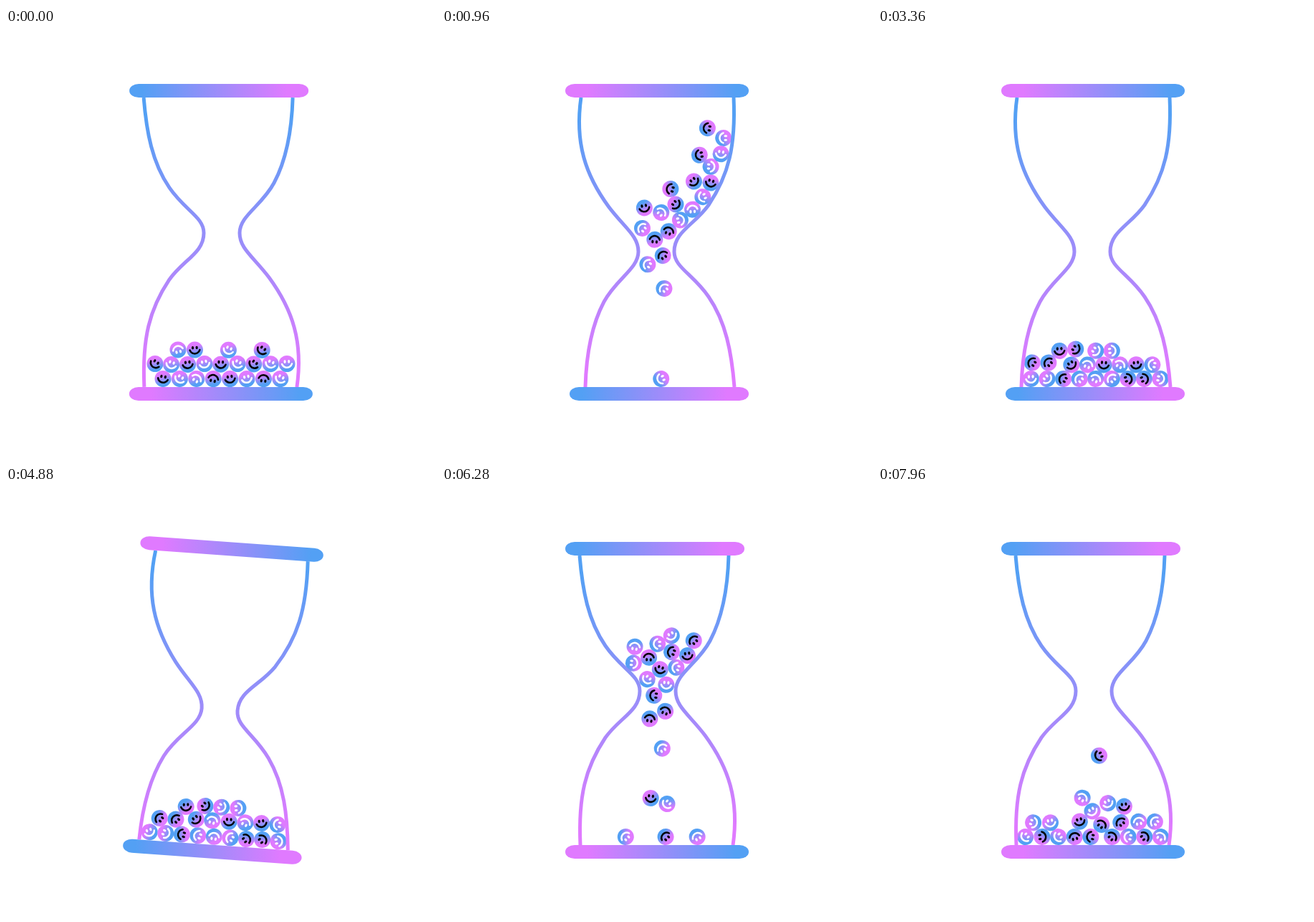
Write an HTML page with a canvas that moves like this. It is 600x600 px and loops after 8 s.

```html
<!DOCTYPE html>
<html lang="en">
<head>
<meta charset="utf-8">
<title>Hourglass</title>
<style>
  html, body { margin: 0; width: 100%; height: 100%; overflow: hidden; background: #fff; }
  canvas { display: block; width: 100vw; height: 100vh; }
  svg { position: absolute; width: 0; height: 0; }
</style>
</head>
<body>
<canvas id="stage" width="600" height="600"></canvas>
<svg aria-hidden="true">
  <path id="left" d="M194 97 C185 160 200 205 233 250 C255 279 274 290 274 312 C274 336 243 350 226 382 C206 420 201 465 200 501"/>
  <path id="right" d="M407 97 C410 165 400 205 372 247 C352 275 324 284 324 312 C324 334 350 343 372 375 C396 410 404 452 408 501"/>
</svg>
<script>
const ctx = document.getElementById('stage').getContext('2d');
const LOOP = 8000, TICK = 40, SUBSTEPS = 20, DT = TICK / 1000 / SUBSTEPS;
const CX = 300, CY = 299, HALF = 202;
const RADIUS = 11.5, CONTACT = 22.6, WALL_GAP = 13;
const GRAVITY = 1300, NECK_DRAG = 8.5, AIR_DRAG = 0.6, MAX_SPEED = 900;
const FIRST_TURN = -20, PERIOD = 4800, TURN_TIME = 560;
const PINK = '#e07aff', BLUE = '#53a0f4';

// The heap at the start: D is dark, L is light, lower case is upside down.
const HEAP = [
  { x: 219, gap: 23.4, y: 489.5, faces: 'DLldDLdL' },
  { x: 208, gap: 23, y: 468.5, faces: 'DLDLDLDLL' },
  { x: 216, gap: 23.5, y: 450, faces: ' lD L D' }
];

const walls = [readWall('left', 1), readWall('right', -1)];

// Keeps the outline for drawing and its x at every whole y for collisions.
function readWall(id, side) {
  const path = document.getElementById(id), edge = [];
  for (let s = 0, end = path.getTotalLength(); s <= end + 0.5; s += 0.25) {
    const p = path.getPointAtLength(Math.min(s, end));
    edge[Math.round(p.y - CY + HALF)] = p.x - CX;
  }
  return { outline: new Path2D(path.getAttribute('d')), edge, side };
}

function turn(ms, start) {
  const p = Math.min(Math.max((ms - start) / TURN_TIME, 0), 1);
  return p < 0.5 ? 4 * p ** 3 : 1 - 4 * (1 - p) ** 3;
}
const glassAngle = ms => Math.PI * (1 + turn(ms, FIRST_TURN) + turn(ms, FIRST_TURN + PERIOD));

// Moves a ball back inside the glass, working in the glass's own axes.
function confine(ball, angle) {
  const c = Math.cos(angle), s = Math.sin(angle), dx = ball.x - CX, dy = ball.y - CY;
  const floor = HALF - RADIUS, clamp = y => Math.min(Math.max(y, -floor), floor);
  let x = c * dx + s * dy, y = clamp(c * dy - s * dx);
  for (const { edge, side } of walls) {
    const i = Math.floor(y + HALF), slope = (edge[i + 2] - edge[i - 2]) / 4;
    const wallX = edge[i] + slope * (y + HALF - i), q = Math.hypot(1, slope);
    const push = WALL_GAP - side * (x - wallX) / q;
    if (push > 0) {
      x += side * push / q;
      y = clamp(y - side * slope * push / q);
    }
  }
  ball.x = CX + c * x - s * y;
  ball.y = CY + s * x + c * y;
}

function settle(balls, angle, rounds) {
  while (rounds--) {
    balls.forEach((a, i) => {
      for (let j = i + 1; j < balls.length; j++) {
        const b = balls[j], dx = b.x - a.x, dy = b.y - a.y, d = Math.hypot(dx, dy);
        if (d >= CONTACT || d === 0) continue;
        const k = (CONTACT - d) / d / 2;
        a.x -= dx * k; a.y -= dy * k;
        b.x += dx * k; b.y += dy * k;
      }
    });
    for (const ball of balls) confine(ball, angle);
  }
}

function createBalls() {
  const balls = [];
  for (const { x, gap, y, faces } of HEAP) {
    [...faces].forEach((face, i) => {
      if (face === ' ') return;
      const upright = face === face.toUpperCase();
      balls.push({
        x: x + gap * i, y, vx: 0, vy: 0, spin: 0,
        dark: face.toUpperCase() === 'D',
        tilt: 0.2 + Math.sin(balls.length * 7.3) * 0.45 + (upright ? 0 : Math.PI)
      });
    });
  }
  return balls;
}

function advance(balls, ms) {
  const angle = glassAngle(ms), swing = angle - glassAngle(ms - DT * 1000);
  for (const b of balls) {
    const inNeck = Math.abs(b.x - CX) < 55 && b.y > 190 && b.y < 310;
    const keep = Math.exp(-(inNeck ? NECK_DRAG : AIR_DRAG) * DT);
    b.oldX = b.x;
    b.oldY = b.y;
    b.x += b.vx * keep * DT;
    b.y += (b.vy * keep + GRAVITY * DT) * DT;
  }
  settle(balls, angle, 4);
  for (const b of balls) {
    b.vx = (b.x - b.oldX) / DT;
    b.vy = (b.y - b.oldY) / DT;
    const limit = Math.min(1, MAX_SPEED / (Math.hypot(b.vx, b.vy) || 1));
    b.vx *= limit;
    b.vy *= limit;
    b.spin += swing + b.vx * DT / (3 * RADIUS);
  }
}

// Works the whole loop out once, so that drawing depends on the time alone.
function simulate() {
  const balls = createBalls(), frames = [];
  settle(balls, glassAngle(0), 30);
  for (let ms = 0; ms < LOOP; ms += TICK) {
    frames.push(balls.map(b => ({ ...b })));
    for (let n = 1; n <= SUBSTEPS; n++) advance(balls, ms + n * DT * 1000);
  }
  return frames;
}

// A gradient through (x, y) reaching the given vector to either side.
function gradient(x, y, dx, dy, from, to, start, end) {
  const g = ctx.createLinearGradient(x - dx, y - dy, x + dx, y + dy);
  g.addColorStop(start, from);
  g.addColorStop(end, to);
  return g;
}

function drawBall(ball) {
  ctx.save();
  ctx.translate(ball.x, ball.y);
  ctx.rotate(ball.spin);
  ctx.fillStyle = gradient(0, 0, 3, RADIUS, PINK, BLUE, 0.25, 0.8);
  ctx.beginPath();
  ctx.arc(0, 0, RADIUS, 0, 2 * Math.PI);
  ctx.fill();
  ctx.rotate(ball.tilt);
  ctx.fillStyle = ctx.strokeStyle = ball.dark ? '#000' : '#fff';
  ctx.lineWidth = 2.5;
  ctx.lineCap = 'round';
  for (const x of [-2.8, 2.8]) {
    ctx.beginPath();
    ctx.ellipse(x, -3, 1.6, 2.3, 0, 0, 2 * Math.PI);
    ctx.fill();
  }
  ctx.beginPath();
  ctx.arc(0, -2, 7.3, 0.1 * Math.PI, 0.9 * Math.PI);
  ctx.stroke();
  ctx.restore();
}

// Colours keep their direction on the stage while the shapes turn.
function drawGlass(angle) {
  const c = Math.cos(angle), s = Math.sin(angle);
  const reach = 108 * Math.abs(s) + HALF * Math.abs(c);
  ctx.strokeStyle = gradient(CX, CY, reach * s, reach * c, BLUE, PINK, 0.06, 0.94);
  ctx.lineWidth = 5;
  for (const { outline } of walls) ctx.stroke(outline);
}

function drawBar(x0, x1, y, angle, from, to, start, end) {
  const c = Math.cos(angle), s = Math.sin(angle), width = x1 - x0;
  const reach = width / 2 * Math.abs(c) + 9.5 * Math.abs(s);
  ctx.fillStyle = gradient((x0 + x1) / 2, y, reach * c, -reach * s, from, to, start, end);
  ctx.beginPath();
  ctx.roundRect(x0, y - 9.5, width, 19, { x: 13, y: 9.5 });
  ctx.fill();
}

const frames = simulate();
const began = performance.now();

function draw() {
  const k = Math.floor(((performance.now() - began) % LOOP) / TICK);
  const angle = glassAngle(k * TICK);
  ctx.fillStyle = '#fff';
  ctx.fillRect(0, 0, 600, 600);
  frames[k].forEach(drawBall);
  ctx.save();
  ctx.translate(CX, CY);
  ctx.rotate(angle);
  ctx.translate(-CX, -CY);
  drawGlass(angle);
  drawBar(172, 428, 87.5, angle, PINK, BLUE, 0.12, 0.93);
  drawBar(178, 428, 510.5, angle, BLUE, PINK, 0.07, 0.88);
  ctx.restore();
  requestAnimationFrame(draw);
}
draw();
</script>
</body>
</html>
```
